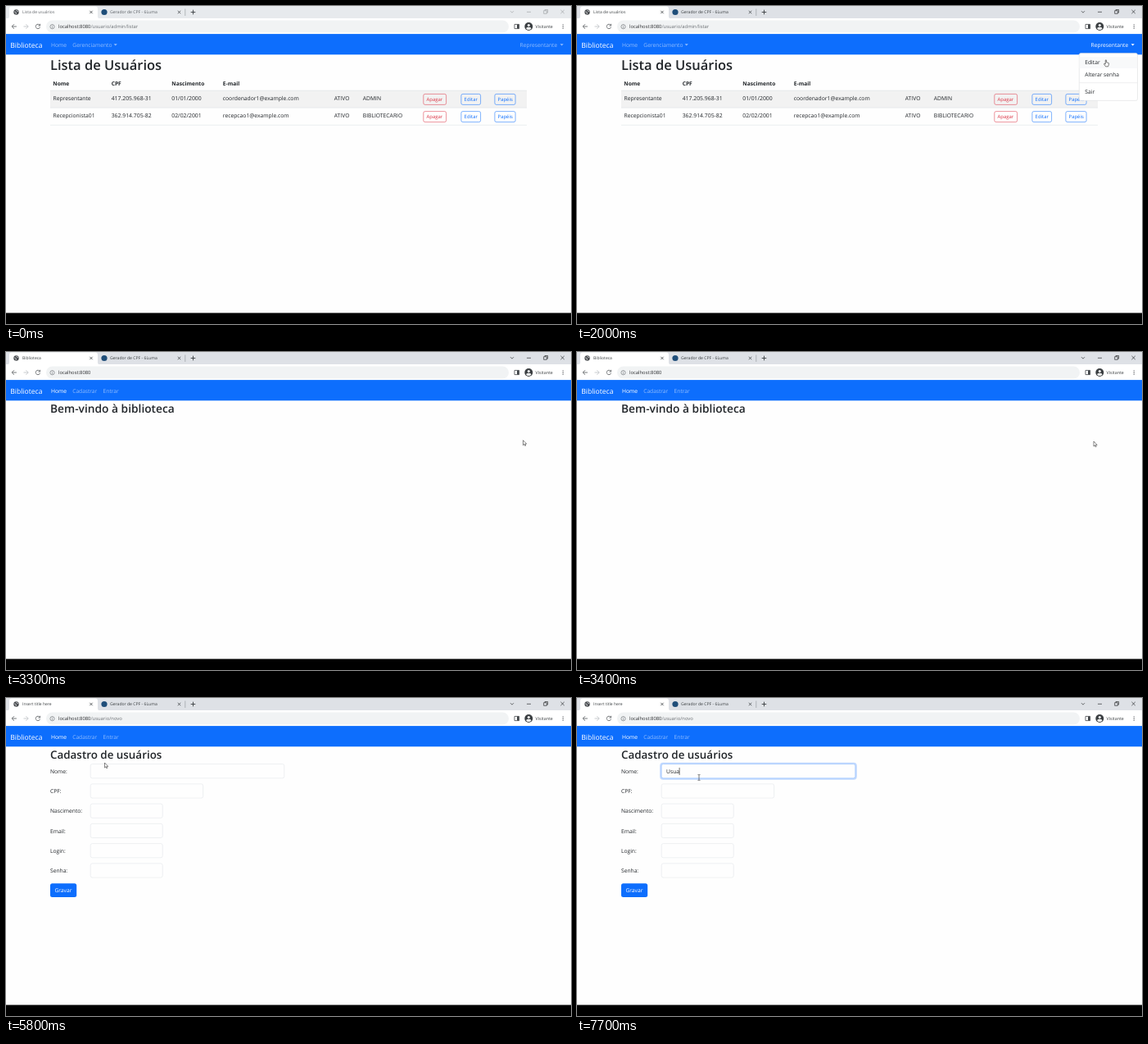
Recreate the animation shown at these times as an HTML page. Size 690 px wide and 388 px high, loop 8000 ms.

```html
<!DOCTYPE html>
<html lang="pt-BR">
<head>
<meta charset="utf-8">
<title>Biblioteca</title>
<style>
  html, body { margin: 0; width: 100%; height: 100%; overflow: hidden; background: #fefefe; }
  svg { display: block; width: 100%; height: 100%; }
  text { font-family: "Open Sans", "Noto Sans", sans-serif; text-rendering: geometricPrecision; white-space: pre; }
</style>
</head>
<body>
<svg id="stage" viewBox="0 0 690 388"></svg>
<script>
const LOOP = 8000, STEP = 100;
const BLUE = '#0d6efd', RED = '#dc3545', INK = '#212529';
const ACTIVATE = 1700, HOME = 3200, FORM = 5000, FOCUS = 6200;

const text = (x, y, s, size = 6.75, fill = INK, weight = 400) =>
  `<text x="${x}" y="${y}" font-size="${size}" fill="${fill}" font-weight="${weight}">${s}</text>`;
const rect = (x, y, w, h, fill, r = 0, more = '') =>
  `<rect x="${x}" y="${y}" width="${w}" height="${h}" fill="${fill}" rx="${r}" ${more}/>`;
const line = (d, stroke, w = .8, fill = 'none') =>
  `<path d="${d}" stroke="${stroke}" stroke-width="${w}" fill="${fill}"/>`;
const dot = (x, y, r, fill, more = '') => `<circle cx="${x}" cy="${y}" r="${r}" fill="${fill}" ${more}/>`;
const cross = (x, y, r, color, w) => line(`M${x - r} ${y - r}l${2 * r} ${2 * r}m0 ${-2 * r}l${-2 * r} ${2 * r}`, color, w);
const caret = (x, fill) => `<path d="M${x} 46.2h4.2l-2.1 2.2z" fill="${fill}"/>`;
const white = a => `rgba(255,255,255,${a})`;
const clamp = v => Math.min(1, Math.max(0, v));
const mix = (a, b, p) => a + (b - a) * p;

function browser(t) {
  const idle = t < ACTIVATE, icon = '#55585c';
  const strip = idle ? '#e7eaed' : '#dee1e6', ctl = idle ? '#a3a5a8' : '#2f3133', label = idle ? '#5f6368' : '#3c4043';
  const title = t < HOME ? 'Lista de usuários' : t < FORM ? 'Biblioteca' : 'Insert title here';
  const path = t < HOME ? '/usuario/admin/listar' : t < FORM ? '' : '/usuario/novo';
  return rect(0, 0, 690, 15.5, strip) +
    '<path d="M1 15.5q3 0 3-3V3.5q0-3 3-3H109q3 0 3 3v9q0 3 3 3z" fill="#fff"/>' +
    dot(12.5, 7.5, 3.2, '#4a4d51') + line('M10.3 7q1.6.2 2 1.2t-.6 1.6M12.6 5.2q.6 1.4 2.2 1.2', '#fff', .8) +
    text(20, 9.4, title, 5, label) + cross(104, 7.5, 1.7, '#3c4043') +
    dot(120, 7.5, 3.6, '#1f4e79') + text(127, 9.4, 'Gerador de CPF - 6Luma', 5.1, label) + cross(211.5, 7.5, 1.7, '#3c4043') +
    line('M218.8 3.5v8.5', '#8f9398', .6) + line('M225.7 7.5h5.6M228.5 4.7v5.6', '#3c4043', .9) +
    line('M616 6.2l2 2 2-2', ctl, .7) + line('M636 7.3h5', ctl, .7) +
    line('M656.7 5.7h3.6v3.6h-3.6zM658 5.7v-1.2h3.6v3.6h-1.3', ctl, .7) + cross(679.6, 7, 2.2, ctl, .7) +
    rect(0, 15, 690, 20, '#fff') + rect(49, 17.5, 565, 15, '#f1f3f4', 7.5) +
    line('M12.9 25H7.3M10 22.2L7.2 25l2.8 2.8', icon) +
    line('M21.5 25h5.6M24.4 22.2l2.8 2.8-2.8 2.8', '#bcbfc3') +
    line('M41.2 23.4a2.7 2.7 0 1 0 .4 2.2M41.6 21.8v2.2h-2.2', icon) +
    dot(56.5, 25.2, 2.6, 'none', 'stroke="#5f6368" stroke-width=".6"') + line('M56.5 24.8v1.9M56.5 23.5v.7', '#5f6368', .6) +
    text(64, 27.2, `localhost:8080<tspan fill="#6b6f74">${path}</tspan>`, 5.85, '#2b2d30') +
    line('M621 22.4h5.6v5.2H621z', '#45484c', .8) + rect(624, 22.4, 2.6, 5.2, '#45484c') +
    dot(638.3, 25, 5, '#3c4043') + dot(638.3, 23.6, 1.5, '#fff') +
    '<path d="M635.3 27.7a3 1.9 0 0 1 6 0 4 4 0 0 1-6 0z" fill="#fff"/>' +
    text(646.5, 27, 'Visitante', 5.3, '#3c4043') +
    [22.8, 25, 27.2].map(y => dot(680.2, y, .65, icon)).join('');
}

function navbar(t) {
  let out = rect(0, 34.1, 690, 25.2, BLUE) + text(5.2, 50.6, 'Biblioteca', 8.6, '#fff');
  if (t < HOME) {
    const user = white(t < 1200 ? .55 : t < 1300 ? .8 : t < ACTIVATE ? .85 : 1);
    return out + text(55, 49.8, 'Home', 6.75, white(.55)) +
      text(81.3, 49.8, 'Gerenciamento', 6.7, white(.55)) + caret(131.6, white(.55)) +
      text(627.5, 49.8, 'Representante', 6.7, user) + caret(676.6, user);
  }
  const hover = t < FORM ? clamp((t - 4600) / 200) : t < 5500 ? 1 : 1 - clamp((t - 5400) / 200);
  return out + text(55, 49.8, 'Home', 6.75, '#fff') +
    text(81.3, 49.8, 'Cadastrar', 6.6, white(mix(.55, .75, hover))) + text(118.6, 49.8, 'Entrar', 6.7, white(.55));
}

const button = (x, y, w, s, color) =>
  rect(x, y, w, 13, 'none', 2, `stroke="${color}" stroke-width=".7" stroke-opacity=".75"`) +
  text(x + 3.7, y + 8.7, s, 5.95, color);

function userRow(y, cells) {
  const xs = [57.5, 128.7, 202.3, 264.8, 400.8, 435.8];
  return cells.map((s, i) => text(xs[i], y + 12, s, /^\d/.test(s) ? 6.85 : 6.75)).join('') +
    button(509.8, y + 4.3, 27.8, 'Apagar', RED) + button(555.9, y + 4.3, 23.7, 'Editar', BLUE) +
    button(596.9, y + 4.3, 25.2, 'Papéis', BLUE) + line(`M54 ${y + 21}h582`, '#dee2e6', .6);
}

function listPage(t) {
  let out = text(54, 77.6, 'Lista de Usuários', 16.5, INK, 600) +
    text(57.3, 96.5, 'Nome', 6.65, INK, 700) + text(128.7, 96.5, 'CPF', 6.65, INK, 700) +
    text(202.3, 96.5, 'Nascimento', 6.65, INK, 700) + text(264.8, 96.5, 'E-mail', 6.65, INK, 700) +
    rect(54, 103, 582, 21.3, '#f2f2f2') + line('M54 103.2h582', '#dee2e6', .6) +
    userRow(103.1, ['Representante', '417.205.968-31', '01/01/2000', 'coordenador1@example.com', 'ATIVO', 'ADMIN']) +
    userRow(124.3, ['Recepcionista01', '362.914.705-82', '02/02/2001', 'recepcao1@example.com', 'ATIVO', 'BIBLIOTECARIO']);
  if (t < ACTIVATE) return out;
  const y = pointer(t).y;
  const hot = y > 97 ? 98 : y > 76 ? 76.5 : y > 62 ? 62 : 0;
  return out + rect(613.3, 57.6, 71.2, 57.8, '#fff', 2, 'stroke="#d5d6d8" stroke-width=".5"') +
    (hot ? rect(613.6, hot, 70.6, 14, '#f8f9fa') : '') +
    text(620.3, 71.2, 'Editar', 6.7) + text(620.3, 85.5, 'Alterar senha', 6.7) +
    line('M613.5 93.7h70.8', '#dcdddf', .5) + text(620.3, 107.3, 'Sair', 6.7);
}

function formPage(t) {
  const typed = 'Usua'.slice(0, [7100, 7300, 7400, 7700].filter(k => t >= k).length);
  const glow = clamp((t - FOCUS + 100) / 200);
  let out = text(54, 74, 'Cadastro de usuários', 13.4, INK, 600);
  ['Nome', 'CPF', 'Nascimento', 'Email', 'Login', 'Senha'].forEach((label, i) => {
    const y = 80.6 + i * 24.25, w = [236.6, 137.5][i] || 88;
    const on = i === 0 && t >= FOCUS;
    out += text(54, y + 11.3, label + ':', 6.7);
    if (on) out += rect(102.2, y - .9, w + 2, 19, 'none', 3, `stroke="${BLUE}" stroke-opacity="${.25 * glow}" stroke-width="2"`);
    out += rect(103.2, y, w, 17.2, '#fefefe', 2.2, `stroke="${on ? '#86b7fe' : '#e3e6e9'}" stroke-width=".6"`);
  });
  out += text(109, 91.9, typed, 6.75);
  const ends = [109.3, 114.3, 117.3, 121.4, 125.1];
  if (t >= FOCUS && (t < 6700 || t >= 7100)) out += line(`M${ends[typed.length]} 85v9`, '#111', .6);
  return out + rect(54, 226.3, 32.2, 16.8, BLUE, 2.5) + text(59.4, 237.4, 'Gravar', 6.7, '#fff');
}

// Pointer moves: start, end, x, y of the hotspot on arrival
const moves = [[1700, 2500, 633, 104], [3100, 3400, 631, 109], [3700, 4600, 108.5, 52], [5400, 5800, 120.5, 79], [5900, 6300, 149, 97]];
function pointer(t) {
  let x = 652, y = 48;
  for (const [from, to, tx, ty] of moves) {
    let p = clamp((t - from) / (to - from));
    p = p * p * (3 - 2 * p);
    x = mix(x, tx, p);
    y = mix(y, ty, p);
  }
  return { x, y };
}

function cursor(t) {
  if (t < ACTIVATE) return '';
  const { x, y } = pointer(t);
  const hand = t < HOME || (t < 5500 && x < 140 && y < 59);
  const beam = t >= 6000 && y > 81;
  const shape = beam ? line('M-1.5-3.4h1.1l.4.4.4-.4h1.1M0-3v6M-1.5 3.4h1.1l.4-.4.4.4h1.1', '#222', .6)
    : hand ? line('M-.7.4q.7-.8 1.3 0v2.7l2.4.6q.7.2.6 1l-.5 2.2-.5 1.2h-3L-2.3 5.4q-.2-1 .7-.8l.9.7z', '#111', .55, '#fff')
    : line('M0 0v6.1l1.4-1.3.9 2 .9-.4-.9-2h1.9z', '#111', .5, '#fff');
  return `<g transform="translate(${x} ${y})">${shape}</g>`;
}

function scene(t) {
  const page = t < HOME ? listPage(t)
    : t < FORM ? text(54, 74, 'Bem-vindo à biblioteca', 13.75, INK, 600) : formPage(t);
  return rect(0, 0, 690, 388, '#fefefe') + browser(t) + navbar(t) + page +
    rect(0, 374.5, 690, 14, '#000') + cursor(t);
}

const stage = document.getElementById('stage');
let shown = -1;
function tick() {
  const t = Math.floor(performance.now() % LOOP / STEP) * STEP;
  if (t !== shown) stage.innerHTML = scene(shown = t);
  requestAnimationFrame(tick);
}
tick();
</script>
</body>
</html>
```
